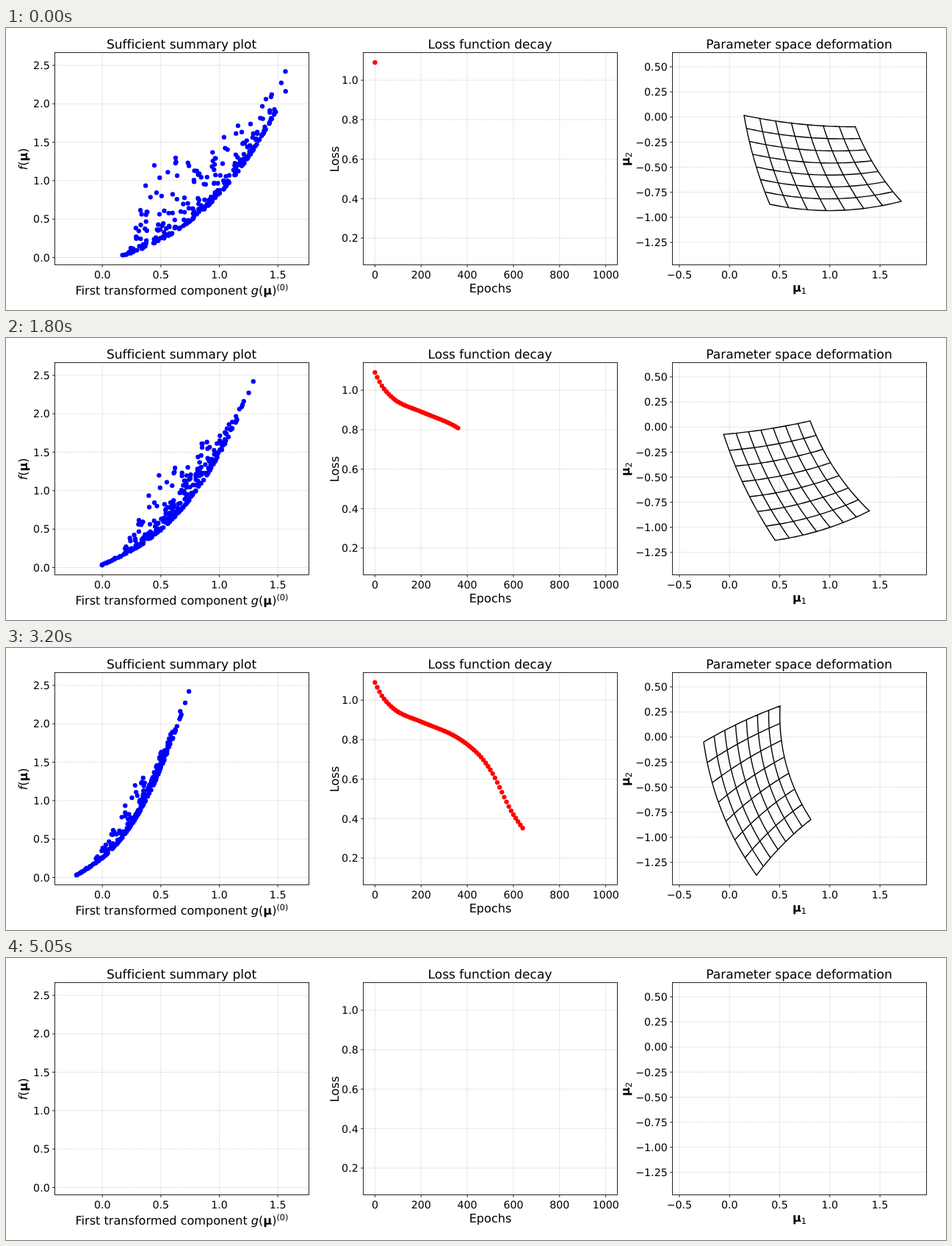
Write an HTML page with a canvas that moves like this. It is 1280 px wide and 384 px high and loops after 5.8 s.

```html
<!DOCTYPE html>
<html lang="en">
<head>
<meta charset="utf-8">
<title>Training progress</title>
<style>
  html, body { margin: 0; width: 100%; height: 100%; overflow: hidden; background: #fff; }
  svg, canvas { position: absolute; left: 0; top: 0; width: 1280px; height: 384px; }
  text {
    font-family: "DejaVu Sans", Verdana, sans-serif; fill: #000;
    font-variant-ligatures: none; text-rendering: geometricPrecision;
  }
  .title { font-size: 17.05px; }
  .label { font-size: 16.1px; }
  .tick { font-size: 14.2px; }
  .grid { stroke: #b0b0b0; stroke-width: .8; stroke-dasharray: .8 1.3; }
  .axis { stroke: #000; stroke-width: .85; fill: none; }
  .b { font-weight: bold; }
  .i { font-style: oblique; }
  .s { font-size: 11.3px; }
</style>
</head>
<body>
<svg id="axes" viewBox="0 0 1280 384"></svg>
<canvas id="data" width="1280" height="384"></canvas>
<script>
const LOOP = 5800, STEP = 50, STEPS = 101;
const TOP = 33.5, BOTTOM = 322.5, WIDTH = 346;
const MU = '<tspan class="b">μ</tspan>';

// A scale maps a value to origin + value * unit, with evenly spaced ticks
const scale = (origin, unit, first, last, gap, digits) =>
  ({ digits, px: v => origin + unit * v, value: p => (p - origin) / unit,
     ticks: Array.from({ length: Math.round((last - first) / gap) + 1 }, (_, i) => first + i * gap) });

const summary = {
  left: 66.5, title: 'Sufficient summary plot',
  x: scale(131.2, 159.3, 0, 1.5, .5, 1), y: scale(312.5, -104.65, 0, 2.5, .5, 1),
  xLabel: `First transformed component <tspan class="i">g</tspan>(${MU})<tspan class="s" dy="-6">(0)</tspan>`,
  yLabel: `<tspan class="i">f</tspan>(${MU})`, xBase: 363, yBase: 28.5
};
const loss = {
  left: 486.5, title: 'Loss function decay',
  x: scale(502.4, .3143, 0, 1000, 200, 0), y: scale(339.8, -268.7, .2, 1, .2, 1),
  xLabel: 'Epochs', yLabel: 'Loss', xBase: 359.5, yBase: 453
};
const space = {
  left: 907.5, title: 'Parameter space deformation',
  x: scale(985.2, 136.6, -.5, 1.5, .5, 1), y: scale(121.2, -136.6, -1.25, .5, .25, 2),
  xLabel: MU + '<tspan class="s" dy="2.6">1</tspan>',
  yLabel: MU + '<tspan class="s" dy="2.6">2</tspan>', xBase: 359, yBase: 849
};

const line = (cls, x1, y1, x2, y2) => `<path class="${cls}" d="M${x1} ${y1}L${x2} ${y2}"/>`;
const text = (cls, x, y, s, anchor = 'middle', extra = '') =>
  `<text class="${cls}" x="${x}" y="${y}" text-anchor="${anchor}" ${extra}>${s}</text>`;
const number = (v, digits) => v.toFixed(digits).replace('-', '−');

function drawAxes(p) {
  const right = p.left + WIDTH, mid = p.left + WIDTH / 2;
  let out = '';
  for (const v of p.x.ticks) {
    const x = p.x.px(v);
    out += line('grid', x, BOTTOM, x, TOP) + line('axis', x, BOTTOM, x, BOTTOM + 3.4) +
      text('tick', x, 340.5, number(v, p.x.digits));
  }
  for (const v of p.y.ticks) {
    const y = p.y.px(v);
    out += line('grid', p.left, y, right, y) + line('axis', p.left - 3.4, y, p.left, y) +
      text('tick', p.left - 6.8, y + 5.2, number(v, p.y.digits), 'end');
  }
  return out +
    `<rect class="axis" x="${p.left}" y="${TOP}" width="${WIDTH}" height="${BOTTOM - TOP}"/>` +
    text('title', mid - .5, 28, p.title) +
    text('label', mid, p.xBase, p.xLabel) +
    text('label', 0, 0, p.yLabel, 'middle', `transform="translate(${p.yBase} 178.5) rotate(-90)"`);
}
document.getElementById('axes').innerHTML = [summary, loss, space].map(drawAxes).join('');

// Monotone cubic curve through a few [t, v] points
function curve(points) {
  const n = points.length;
  const slope = i => (points[i + 1][1] - points[i][1]) / (points[i + 1][0] - points[i][0]);
  const inner = i => {
    const a = slope(i - 1), b = slope(i);
    return a * b > 0 ? 2 * a * b / (a + b) : 0;
  };
  const m = points.map((_, i) =>
    i === 0 ? 1.5 * slope(0) - .5 * inner(1)
    : i === n - 1 ? 1.5 * slope(n - 2) - .5 * inner(n - 2)
    : inner(i));
  return t => {
    let i = 0;
    while (i < n - 2 && t > points[i + 1][0]) i++;
    const [t0, v0] = points[i], [t1, v1] = points[i + 1];
    const h = t1 - t0, s = (t - t0) / h, r = 1 - s;
    return v0 * (1 + 2 * s) * r * r + v1 * s * s * (3 - 2 * s) + h * s * r * (m[i] * r - m[i + 1] * s);
  };
}

// Patch at key times: corners clockwise from top left, then the bow of the
// top, right, bottom and left edges
const poses = [
  { t: 0, corners: [1005, 119, 1156.5, 134.5, 1219, 236, 1040, 240], bows: [4, 5.5, 10.5, 3.5] },
  { t: 600, corners: [997, 128, 1133, 124, 1217, 230, 1062, 257], bows: [5, 5.8, 9.5, 3.7] },
  { t: 2200, corners: [970, 131.5, 1083, 108, 1156, 236.5, 1040.5, 282.5], bows: [.7, 9.2, 3.6, 6.4] },
  { t: 3200, corners: [950, 128, 1054, 79, 1096, 233.5, 1022, 309.5], bows: [-2.6, 12.8, -3.6, 11.8] },
  { t: 4300, corners: [944.5, 124, 1048.5, 48, 1086.5, 200.5, 1030, 299], bows: [-1, 10.6, -7.5, 10.5] }
];
const SETTLE = 4300, DRIFT = .3;
const flat = p => [...p.corners, ...p.bows];
const tracks = flat(poses[0]).map((_, k) => curve(poses.map(p => [p.t, flat(p)[k]])));

const mix = (p, q, s) => [p[0] + (q[0] - p[0]) * s, p[1] + (q[1] - p[1]) * s];

// Bowed edge from p to q
function edge(p, q, bow) {
  const dx = q[0] - p[0], dy = q[1] - p[1], size = bow / Math.hypot(dx, dy);
  return s => {
    const [x, y] = mix(p, q, s), lift = 4 * s * (1 - s) * size;
    return [x - dy * lift, y + dx * lift];
  };
}

// Map from the unit square to the deformed patch at time t
function warpAt(t) {
  const v = tracks.map(f => f(t < SETTLE ? t : SETTLE + (t - SETTLE) * DRIFT));
  const [A, B, C, D] = [0, 2, 4, 6].map(i => [v[i], v[i + 1]]);
  const top = edge(A, B, v[8]), right = edge(B, C, v[9]);
  const bottom = edge(D, C, v[10]), left = edge(A, D, v[11]);
  return (a, b) => {
    const down = mix(top(b), bottom(b), a), across = mix(left(a), right(a), b);
    const plain = mix(mix(A, B, b), mix(D, C, b), a);
    return [0, 1].map(i => down[i] + across[i] - plain[i]);
  };
}

function random(seed) {
  return () => {
    seed = seed + 0x6D2B79F5 | 0;
    let t = Math.imul(seed ^ seed >>> 15, 1 | seed);
    t = t + Math.imul(t ^ t >>> 7, 61 | t) ^ t;
    return ((t ^ t >>> 14) >>> 0) / 4294967296;
  };
}

// Uniform samples of the unit square with their function value
const value = (a, b) => a ** 3 + b ** 3 + .2 * a + .6 * b;
const rnd = random(42), samples = [];
while (samples.length < 300) {
  const a = rnd(), b = rnd(), f = value(a, b);
  if (f > .025 && f < 2.54) samples.push({ a, b, f });
}

const lossAt = curve([
  [0, 1.09], [40, 1.006], [100, .941], [200, .891], [340, .822], [440, .736],
  [500, .647], [600, .42], [700, .267], [800, .161], [1000, .113]
]);

const ctx = document.getElementById('data').getContext('2d');
const GRID = 7, FINE = 28;

function dot(x, y) {
  ctx.beginPath();
  ctx.arc(x, y, 3.15, 0, 2 * Math.PI);
  ctx.fill();
}

function drawMesh(warp) {
  ctx.strokeStyle = '#000';
  ctx.lineWidth = 1.4;
  ctx.lineJoin = 'round';
  ctx.lineCap = 'square';
  ctx.beginPath();
  for (let i = 0; i <= GRID; i++) {
    for (const across of [true, false]) {
      for (let j = 0; j <= FINE; j++) {
        const c = i / GRID, s = j / FINE;
        const [x, y] = across ? warp(c, s) : warp(s, c);
        if (j) ctx.lineTo(x, y); else ctx.moveTo(x, y);
      }
    }
  }
  ctx.stroke();
}

let shown = -1;
function render(ms) {
  const n = Math.floor(ms % LOOP / STEP);
  if (n === shown) return;
  shown = n;
  ctx.clearRect(0, 0, 1280, 384);
  if (n >= STEPS) return;
  const warp = warpAt(n * STEP);
  ctx.fillStyle = '#00f';
  for (const { a, b, f } of samples) {
    const feature = space.x.value(warp(a, b)[0]);
    dot(summary.x.px(feature), summary.y.px(f));
  }
  ctx.fillStyle = '#f00';
  for (let epoch = 0; epoch <= n * 10; epoch += 10) dot(loss.x.px(epoch), loss.y.px(lossAt(epoch)));
  drawMesh(warp);
}

const began = performance.now();
function tick() {
  render(performance.now() - began);
  requestAnimationFrame(tick);
}
tick();
</script>
</body>
</html>
```
